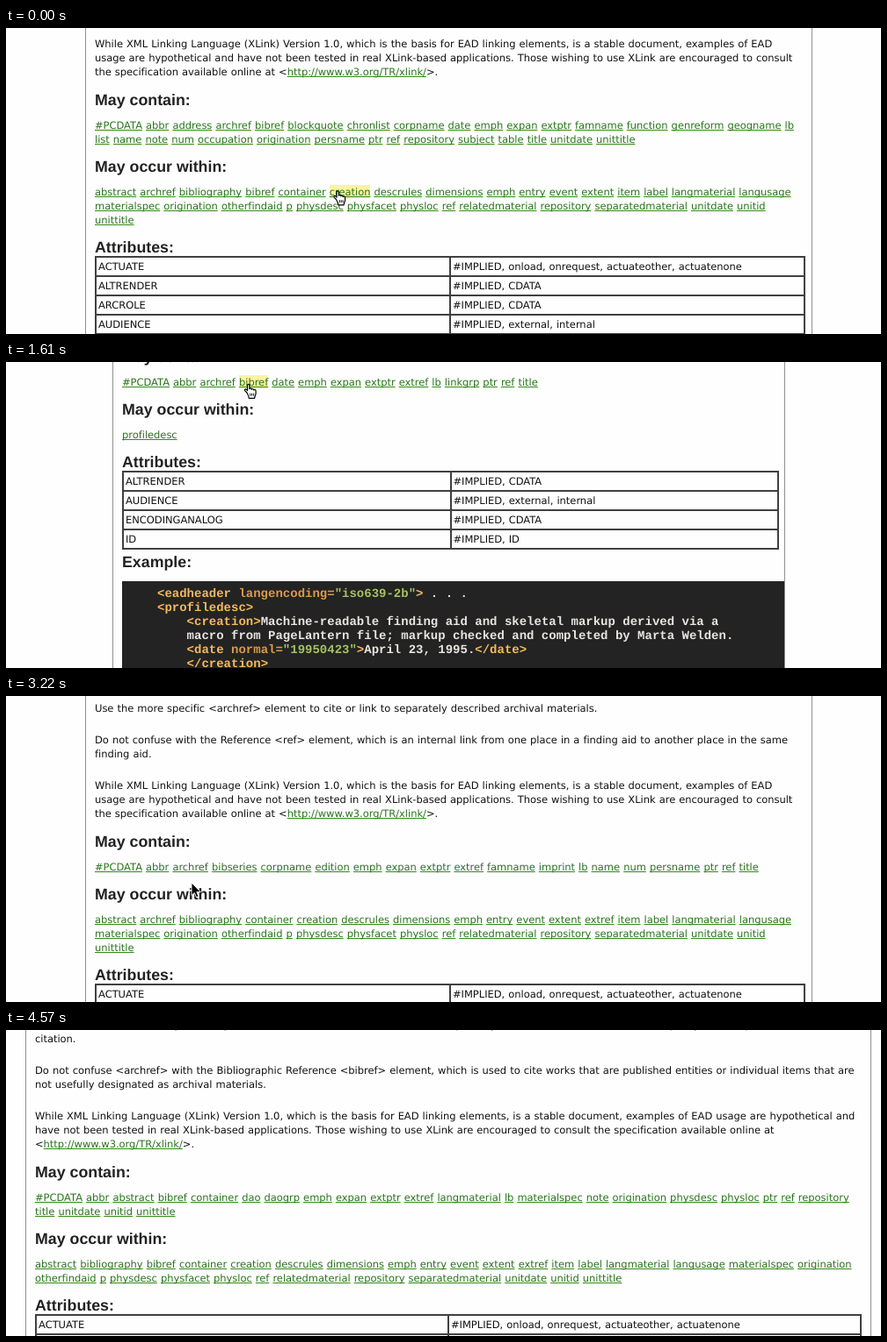
An HTML page for the animation above (4.84 s loop, 995 by 349 pixels).

```html
<!DOCTYPE html>
<html lang="en">
<head>
<meta charset="utf-8">
<title>Tag library browsing</title>
<style>
  html, body { margin: 0; width: 100%; height: 100%; overflow: hidden; background: #fefefe; }
  body { position: relative; color: #222; text-rendering: geometricPrecision; font-kerning: none; }
  section { position: absolute; inset: 0; overflow: hidden; visibility: hidden; }
  section.shown { visibility: visible; }
  section > * { position: absolute; margin: 0; box-sizing: border-box; white-space: pre; }
  p, table { font: 11.5px/16px "DejaVu Sans", sans-serif; letter-spacing: -.033px; word-spacing: .43px; color: #111; }
  a { color: #28741b; text-decoration: underline 1px #348a16; text-underline-offset: 1px; text-decoration-skip-ink: none; }
  .hover .target { background: #fbf3a0; padding-top: 1px; }
  h2 { font: bold 17.8px/20px "Liberation Sans", sans-serif; }
  h3 { font: bold 14.4px/15px "Liberation Sans", sans-serif; color: #666; background: #fff9c8; }
  .frame { top: -2px; bottom: -2px; border: 1px solid #919191; }
  table { border-collapse: collapse; table-layout: fixed; }
  td { border: 2px solid #404040; padding: 0 2px; height: 20px; line-height: 20px; }
  pre { font: bold 14px/16px "Liberation Mono", monospace; color: #e9e5df; background: #232323; padding: 7px 0 0 40px; }
  .tag { color: #f5b95a; }
  .attr { color: #dc9a45; }
  .str { color: #a5c261; }
  svg { position: absolute; left: 0; top: 0; width: 20px; height: 20px; overflow: visible; }
</style>
</head>
<body>
<svg id="cursor">
  <g id="arrow">
    <path d="M0 0V14.5L3.3 11.4L5.6 16.6L8 15.5L5.8 10.5H10.3Z" fill="#000" stroke="#fff" stroke-width=".9"/>
  </g>
  <g id="hand" fill="#fff" stroke="#000" stroke-width="1.2" stroke-linejoin="round">
    <path d="M3.5 10.5L1.3 8.4C.2 7.1 1.7 5.9 2.8 6.9L4 8V2.2C4 .5 6.4 .5 6.4 2.2V6.2C6.6 5.2 8.8 5.4 8.8 6.7C9.2 5.8 11.2 6.1 11.2 7.4C11.8 6.7 13.6 7.1 13.6 8.6V11.2C13.6 13.2 12.4 13.8 12.1 16.9H5.8C5.6 14.4 4.6 12.4 3.5 10.5Z"/>
    <path d="M7.3 11.2v3M9.2 11.2v3M11.1 11.2v3" stroke-width=".9"/>
  </g>
</svg>
<script>
const [cursorBox, arrow, hand] = ['cursor', 'arrow', 'hand'].map(id => document.getElementById(id));

const escapeHtml = text => text.replace(/</g, '&lt;').replace(/>/g, '&gt;');
const at = (x, y) => `left:${x}px;top:${y}px`;

// For text, y is the middle of the first line.
const block = (x, y, html) => `<p style="${at(x, y - 8)}">${html}</p>`;
const para = (x, y, lines) =>
  block(x, y, escapeHtml(lines.join('\n')).replace(/http:[\w.\/]+/, '<a>$&</a>'));
const links = (x, y, lines) => block(x, y, lines.join('\n').replace(/\S+/g, '<a>$&</a>'));
const heading = (x, y, text) => `<h2 style="${at(x, y - 10)}">${text}</h2>`;
const band = (y, text) => `<h3 style="${at(132, y - 7)};width:753px">${text}</h3>`;

const table = (x, y, width, rows) =>
  `<table style="${at(x, y)};width:${width}px">` +
  rows.map(([name, type]) => `<tr><td>${name}</td><td>#IMPLIED, ${type}</td></tr>`).join('') + '</table>';

const code = (x, y, width, lines) =>
  `<pre style="${at(x, y)};width:${width}px;bottom:0">` +
  lines.join('\n').replace(/<(\/?\w+)( \w+=)?("[^"]*")?>/g, (_, name, attr = '', value = '') =>
    `<span class="tag">&lt;${name}</span><span class="attr">${attr}</span>` +
    `<span class="str">${value}</span><span class="tag">&gt;</span>`) + '</pre>';

function addPage(left, right, target, ...parts) {
  const page = document.createElement('section');
  page.innerHTML = `<div class="frame" style="left:${left}px;width:${right - left + 1}px"></div>` + parts.join('');
  [...page.querySelectorAll('a')].find(a => a.textContent === target)?.classList.add('target');
  cursorBox.before(page);
  return page;
}

const actuate = ['ACTUATE', 'onload, onrequest, actuateother, actuatenone'];
const altrender = ['ALTRENDER', 'CDATA'];
const audience = ['AUDIENCE', 'external, internal'];

const xlinkNarrow = [
  'While XML Linking Language (XLink) Version 1.0, which is the basis for EAD linking elements, is a stable document, examples',
  'of EAD usage are hypothetical and have not been tested in real XLink-based applications. Those wishing to use XLink are',
  'encouraged to consult the specification available online at <http://www.w3.org/TR/xlink/>.'];
const xlinkMedium = [
  'While XML Linking Language (XLink) Version 1.0, which is the basis for EAD linking elements, is a stable document, examples of EAD',
  'usage are hypothetical and have not been tested in real XLink-based applications. Those wishing to use XLink are encouraged to consult',
  'the specification available online at <http://www.w3.org/TR/xlink/>.'];
const xlinkWide = [
  'While XML Linking Language (XLink) Version 1.0, which is the basis for EAD linking elements, is a stable document, examples of EAD usage are hypothetical and',
  'have not been tested in real XLink-based applications. Those wishing to use XLink are encouraged to consult the specification available online at',
  '<http://www.w3.org/TR/xlink/>.'];

// Unstyled state shown while an entry is still loading.
const rawPage = (intro, contains, within) => addPage(121, 885, null, intro,
  para(132, 176, xlinkNarrow),
  band(238, 'May contain:'), para(132, 265, contains),
  band(310, 'May occur within:'), para(132, 336, within));

const start = addPage(90, 916, 'creation',
  para(101, 18, xlinkMedium),
  heading(101, 82, 'May contain:'),
  links(101, 111, [
    '#PCDATA abbr address archref bibref blockquote chronlist corpname date emph expan extptr famname function genreform geogname lb',
    'list name note num occupation origination persname ptr ref repository subject table title unitdate unittitle']),
  heading(101, 158, 'May occur within:'),
  links(101, 187, [
    'abstract archref bibliography bibref container creation descrules dimensions emph entry event extent item label langmaterial langusage',
    'materialspec origination otherfindaid p physdesc physfacet physloc ref relatedmaterial repository separatedmaterial unitdate unitid',
    'unittitle']),
  heading(101, 250, 'Attributes:'),
  table(101, 260, 808, [actuate, altrender, ['ARCROLE', 'CDATA'], audience]));

const creation = addPage(121, 885, 'bibref',
  heading(132, -6, 'May contain:'),
  links(132, 23, ['#PCDATA abbr archref bibref date emph expan extptr extref lb linkgrp ptr ref title']),
  heading(132, 54, 'May occur within:'),
  links(132, 83, ['profiledesc']),
  heading(132, 114, 'Attributes:'),
  table(132, 124, 747, [altrender, audience, ['ENCODINGANALOG', 'CDATA'], ['ID', 'ID']]),
  heading(132, 228, 'Example:'),
  code(132, 250, 753, [
    '<eadheader langencoding="iso639-2b"> . . .',
    '<profiledesc>',
    '    <creation>Machine-readable finding aid and skeletal markup derived via a',
    '    macro from PageLantern file; markup checked and completed by Marta Welden.',
    '    <date normal="19950423">April 23, 1995.</date>',
    '    </creation>']));

const bibrefRaw = rawPage(
  para(132, 0, [
    '<title>, <imprint>, or <edition>, although the latter two elements are unlikely to be used for unpublished works.']) +
  para(132, 36, [
    'A list of <bibref>s may be gathered into a <bibliography>. A single <bibref> may be part of a Paragraph <p>. Use the HREF',
    'or ENTITYREF attribute to point to an electronic bibliographic work.']) +
  para(132, 88, ['Use the more specific <archref> element to cite or link to separately described archival materials.']) +
  para(132, 124, [
    'Do not confuse with the Reference <ref> element, which is an internal link from one place in a finding aid to another place in',
    'the same finding aid.']),
  ['#PCDATA, abbr, archref, bibseries, corpname, edition, emph, expan, extptr, extref, famname, imprint, lb, name, num,',
   'persname, ptr, ref, title'],
  ['abstract, archref, bibliography, container, creation, descrules, dimensions, emph, entry, event, extent, extref, item, label,',
   'langmaterial, langusage, materialspec, origination, otherfindaid, p, physdesc, physfacet, physloc, ref, relatedmaterial,']);

const bibref = addPage(90, 916, 'archref',
  para(101, 14, ['Use the more specific <archref> element to cite or link to separately described archival materials.']),
  para(101, 50, [
    'Do not confuse with the Reference <ref> element, which is an internal link from one place in a finding aid to another place in the same',
    'finding aid.']),
  para(101, 102, xlinkMedium),
  heading(101, 166, 'May contain:'),
  links(101, 195, [
    '#PCDATA abbr archref bibseries corpname edition emph expan extptr extref famname imprint lb name num persname ptr ref title']),
  heading(101, 226, 'May occur within:'),
  links(101, 255, [
    'abstract archref bibliography container creation descrules dimensions emph entry event extent extref item label langmaterial langusage',
    'materialspec origination otherfindaid p physdesc physfacet physloc ref relatedmaterial repository separatedmaterial unitdate unitid',
    'unittitle']),
  heading(101, 318, 'Attributes:'),
  table(101, 328, 808, [actuate, altrender]));

const archrefRaw = rawPage(
  para(132, 36, [
    'A reference element that provides a citation and/or a link to separately described archival materials of special interest.']) +
  para(132, 72, [
    'The <archref> element may contain just text; however, subelements, such as <repository> or <unittitle>, can be',
    'used to specify the components of a citation.']) +
  para(132, 124, [
    'Do not confuse <archref> with the Bibliographic Reference <bibref> element, which is used to cite works that are published',
    'entities or individual items that are not usefully designated as archival materials.']),
  ['#PCDATA, abbr, abstract, bibref, container, dao, daogrp, emph, expan, extptr, extref, langmaterial, lb, materialspec, note,',
   'origination, physdesc, physloc, ptr, ref, repository, title, unitdate, unitid, unittitle'],
  ['abstract, bibliography, bibref, container, creation, descrules, dimensions, emph, entry, event, extent, extref, item, label,',
   'langmaterial, langusage, materialspec, origination, otherfindaid, p, physdesc, physfacet, physloc, ref, relatedmaterial,']);

const archref = addPage(22, 983, null,
  para(33, -6, [
    'The <archref> element may contain just text; however, subelements, such as <repository> or <unittitle>, can be used to specify the components of a',
    'citation.']),
  para(33, 46, [
    'Do not confuse <archref> with the Bibliographic Reference <bibref> element, which is used to cite works that are published entities or individual items that are',
    'not usefully designated as archival materials.']),
  para(33, 98, xlinkWide),
  heading(33, 162, 'May contain:'),
  links(33, 191, [
    '#PCDATA abbr abstract bibref container dao daogrp emph expan extptr extref langmaterial lb materialspec note origination physdesc physloc ptr ref repository',
    'title unitdate unitid unittitle']),
  heading(33, 238, 'May occur within:'),
  links(33, 267, [
    'abstract bibliography bibref container creation descrules dimensions emph entry event extent extref item label langmaterial langusage materialspec origination',
    'otherfindaid p physdesc physfacet physloc ref relatedmaterial repository separatedmaterial unitdate unitid unittitle']),
  heading(33, 314, 'Attributes:'),
  table(33, 324, 940, [actuate, altrender]));

// start time, page, pointer shape, x, y, link highlighted
const steps = [
  [0, start, 'hand', 372, 185, true],
  [270, creation, 'arrow', 377, 185.5],
  [530, creation, 'arrow', 290, 140],
  [800, creation, 'arrow', 277, 112],
  [1340, creation, 'arrow', 275, 39],
  [1610, creation, 'hand', 270.5, 24.5, true],
  [2150, bibrefRaw, 'hand', 270.5, 24.5],
  [2410, bibref, 'hand', 270.5, 24.5],
  [2680, bibref, 'hand', 234.5, 194.5],
  [2950, bibref, 'arrow', 222, 246],
  [3220, bibref, 'arrow', 211, 213],
  [3490, bibref, 'arrow', 208, 202],
  [3760, bibref, 'hand', 207.5, 194.5, true],
  [4030, archrefRaw, 'hand', 207.5, 194.5],
  [4300, archref, 'hand', 620.5, 283.5],
  [4570, archref, null, 0, 0]];
const duration = 4840;

function draw() {
  const time = performance.now() % duration;
  const [, page, shape, x, y, hover] = steps.findLast(step => step[0] <= time);
  for (const section of document.querySelectorAll('section')) {
    section.classList.toggle('shown', section === page);
    section.classList.toggle('hover', section === page && !!hover);
  }
  arrow.style.display = shape === 'arrow' ? '' : 'none';
  hand.style.display = shape === 'hand' ? '' : 'none';
  cursorBox.style.transform = `translate(${x}px,${y}px)`;
  requestAnimationFrame(draw);
}

draw();
</script>
</body>
</html>
```
